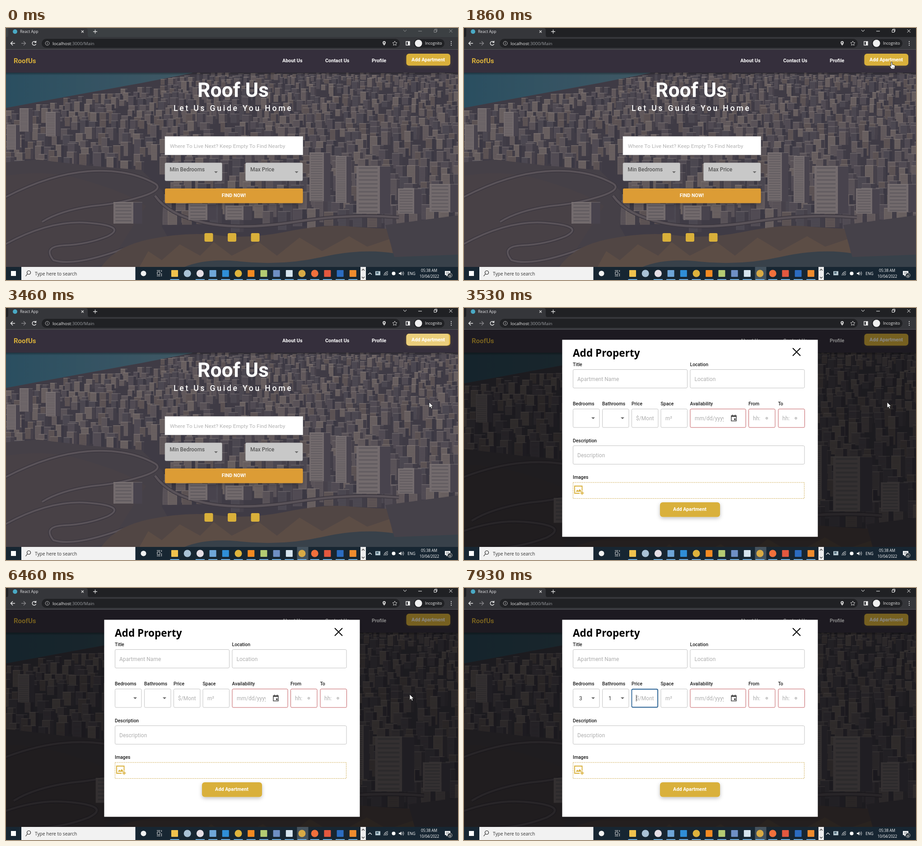
Animation, 1001 px wide and 559 px high, one loop 8 s. Source, as an HTML page:

```html
<!DOCTYPE html>
<html lang="en">
<head>
<meta charset="utf-8">
<title>Apartment finder</title>
<style>
html, body { margin: 0; width: 100%; height: 100%; overflow: hidden; background: #202124; }
svg { display: block; width: 100vw; height: 100vh; }
text { white-space: pre; }
</style>
</head>
<body>
<svg id="stage" viewBox="0 0 1001 559" preserveAspectRatio="none"></svg>
<script>
const LOOP = 8000;
const GOLD = '#d9b03a';
const ROBOTO = 'Roboto, sans-serif', SYSTEM = "'Open Sans', sans-serif";

// ---- drawing helpers ----
const rect = (x, y, w, h, fill, more = '') =>
  `<rect x="${x}" y="${y}" width="${w}" height="${h}" fill="${fill}" ${more}/>`;
const disc = (x, y, r, fill, more = '') =>
  `<circle cx="${x}" cy="${y}" r="${r}" fill="${fill}" ${more}/>`;
const shape = (d, fill, more = '') => `<path d="${d}" fill="${fill}" ${more}/>`;
const line = (d, stroke, width = 1, more = '') =>
  `<path d="${d}" fill="none" stroke="${stroke}" stroke-width="${width}" ${more}/>`;
const text = (x, y, size, fill, str, { w = 400, font = ROBOTO, mid = false, ls = 0, more = '' } = {}) =>
  `<text x="${x}" y="${y}" font-size="${size}" fill="${fill}" font-weight="${w}" font-family="${font}"` +
  ` letter-spacing="${ls}" ${mid ? 'text-anchor="middle"' : ''} ${more}>${str}</text>`;
const group = (id, body, more = '') => `<g id="${id}" ${more}>${body}</g>`;
const caretDown = (x, y, fill) => shape(`M${x - 4} ${y}h8l-4 4z`, fill);

function randomizer(seed) {
  return () => (seed = (seed * 16807) % 2147483647) / 2147483647;
}

// ---- aerial city backdrop ----
function tower(x, y, w, h, face, side) {
  const s = w * 0.45, floor = Math.max(1.2, w * 0.07);
  return rect(x, y, w, h, face) + rect(x + w, y + 1, s, h - 1, side) +
    line(`M${x + w / 2} ${y + 3}V${y + h}`, '#37343d', w * 0.8,
      `stroke-dasharray="${floor} ${floor * 1.4}" opacity=".25"`) +
    rect(x, y, w + s, 1.2, '#9a918c', 'opacity=".5"');
}

function city() {
  const rnd = randomizer(2024);
  const faces = ['#635c5e', '#6d6463', '#585359', '#766c68', '#524e55', '#665c59'];
  const sides = ['#423f47', '#3b3942', '#48434a'];
  const pick = list => list[Math.floor(rnd() * list.length)];
  const shore = x => 178 - x * 0.19;
  let out = '';
  for (let row = 0; row < 24; row++) {
    const depth = row / 23, y = 100 + 310 * Math.pow(depth, 1.25);
    for (let x = -10 + rnd() * 10; x < 1005;) {
      const w = 5 + depth * 11 + rnd() * 6, h = 8 + depth * 20 + rnd() * (12 + depth * 18);
      const top = y - h * 0.3 + rnd() * 10;
      const hill = x < 345 && top > 285 + Math.abs(x - 150) * 0.1;
      const sea = x < 420 && top < shore(x);
      if (!hill && !sea && rnd() < 0.86) out += tower(x, top, w, h, pick(faces), pick(sides));
      x += w * 1.45 + rnd() * (5 + depth * 6);
    }
  }
  return out;
}

function photo() {
  const road = (d, w) => line(d, '#3b373d', w + 3) + line(d, '#5f585c', w);
  const block = (x, y, w, h) => tower(x, y, w, h, '#7c7473', '#4a464e');
  return rect(-80, 60, 1160, 560, '#403d45') +
    shape('M-80 60H460L412 100 300 122 190 142 60 166-80 192z', 'url(#sea)') +
    city() +
    shape('M-80 305L70 292 180 305 300 315 350 365 345 440 400 540-80 620z', '#474247') +
    shape('M-80 345Q60 305 165 335T310 395L230 520-80 600z', '#4c4446', 'opacity=".8"') +
    road('M-20 385Q90 325 180 318T330 345Q350 358 300 374T190 395Q120 405 80 430', 4) +
    road('M-20 490Q90 425 180 432T225 462Q180 480 130 482T105 515Q150 530 260 490', 4) +
    road('M330 372Q360 415 440 432T640 430T870 420', 5) +
    shape('M205 540Q235 485 320 468T470 460T620 452T760 440T870 446L905 540z', '#554944') +
    shape('M290 540L315 495 345 515 385 480 430 505 460 475 500 505 560 475 600 505 650 465 700 495 760 462 800 485 850 468 865 540z',
      '#6b5846', 'opacity=".6"') +
    shape('M375 540Q430 508 520 518T700 508T860 500L1080 475V620H375z', '#38434a') +
    shape('M840 437L1080 405V500L860 508z', '#474349') +
    block(238, 386, 44, 48) + block(2, 214, 20, 56) + block(30, 178, 20, 52) + block(88, 186, 22, 54) +
    block(672, 276, 32, 108) + block(730, 284, 24, 104) + block(776, 306, 52, 106) +
    block(868, 356, 36, 56) + block(938, 346, 46, 62) + block(404, 390, 42, 36) + block(486, 394, 40, 32) +
    shape('M-80 60H1080V620H-80z', '#3a3548', 'opacity=".14"');
}

// ---- browser ----
function browser() {
  const sys = { font: SYSTEM };
  const controls = line('M880 4l3.5 4 3.5-4M913 7h8M948 4.500h5v5h-5zM949.500 4v-1.500h5v5h-1.500M981.500 3l7 7m0-7l-7 7', '#fff');
  return rect(0, 0, 1001, 21, '#202124', 'id="tabStrip"') +
    shape('M0 21Q5 21 5 15V0H176Q181 0 181 5V15Q181 21 187 21z', '#35363a') +
    rect(0, 20, 1001, 28, '#35363a') + rect(0, 47, 1001, 1, '#56565b') +
    disc(20, 8, 5, '#4aa9c4') + text(31, 11, 8.7, '#e4e4e6', 'React App', sys) +
    line('M167 5.500l5 5m0-5l-5 5', '#ddd', 1.1) + line('M193 8h9M197.500 3.500v9', '#ddd', 1.3) +
    group('controls', controls) +
    line('M20 34h-9m4-4.500l-4.500 4.500 4.500 4.500', '#e8e8e8', 1.5) +
    line('M34 34h9m-4-4.500l4.500 4.500-4.500 4.500', '#858589', 1.4) +
    line('M66 31.500a4.300 4.300 0 1 0 .5 4M66.500 28.500v3.500h-3.500', '#e8e8e8', 1.5) +
    rect(79, 24, 793, 20, '#202124', 'rx="10"') +
    disc(91.500, 34, 4.400, 'none', 'stroke="#bbb"') + line('M91.500 33.300v3M91.500 31v1.200', '#bbb') +
    text(103, 37.5, 9.8, '#9b9ea2', '<tspan fill="#eee">localhost</tspan>:3000/Main', sys) +
    shape('M837.500 39q-3.500-4-3.500-6.500a3.500 3.500 0 0 1 7 0q0 2.500-3.500 6.500z', '#ccc') + disc(837.5, 32.5, 1.2, '#202124') +
    line('M861 29l1.500 3.200 3.500.4-2.600 2.400.7 3.500-3.100-1.700-3.100 1.700.7-3.500-2.600-2.400 3.500-.4z', '#ccc') +
    line('M886 30h8v8h-8z', '#eee', 1.4) + rect(890, 30, 4, 8, '#eee') +
    rect(903, 24.5, 68, 19, '#202124', 'rx="9.5"') + disc(913.5, 34, 8, '#f1f1f1') +
    text(928, 37, 8.6, '#eee', 'Incognito', sys) +
    [30, 34, 38].map(y => disc(986, y, 1.1, '#eee')).join('');
}

// ---- landing page ----
function page() {
  const menu = (x, label) => rect(x, 299, 126.5, 40, '#c8c8c8', 'rx="2.500" stroke="#aaa" stroke-width=".6"') +
    text(x + 10.5, 317.5, 11.9, '#575757', label, { w: 500 }) + caretDown(x + 113, 318, '#6a6a6a');
  return group('view', group('photo', photo()), 'clip-path="url(#viewClip)"') +
    rect(0, 98, 1001, 7, 'url(#navShade)') + rect(0, 48, 1001, 51, '#352f3c') +
    text(17, 78, 15, GOLD, 'RoofUs', { w: 700 }) +
    [[612, 'About Us'], [707, 'Contact Us'], [810, 'Profile']]
      .map(([x, s]) => text(x, 75.5, 10.8, '#fff', s, { w: 700 })).join('') +
    rect(886.5, 57, 97.5, 26.5, GOLD, 'rx="6" filter="url(#glow)"') +
    group('ripple', disc(934, 70, 49, '#ebcf7c', 'id="wave"'), 'clip-path="url(#buttonClip)"') +
    text(935, 73.5, 10.8, '#fff', 'Add Apartment', { w: 700, mid: true }) +
    text(503, 152.5, 44.5, '#fff', 'Roof Us', { w: 700, mid: true }) +
    text(371, 183.5, 17.6, '#fff', 'Let Us Guide You Home', { w: 500, ls: 3.75 }) +
    rect(352, 240.5, 305.5, 41, '#fff', 'stroke="#ccc" stroke-width=".7"') +
    text(363, 265.5, 11.8, '#b3b3b3', 'Where To Live Next? Keep Empty To Find Nearby', { ls: 0.05 }) +
    menu(352, 'Min Bedrooms') + menu(530.5, 'Max Price') +
    rect(352, 356, 305.5, 32.5, '#dc9c34', 'rx="2.500" filter="url(#soft)"') +
    text(504.5, 375, 10.7, '#fff', 'FIND NOW!', { w: 700, mid: true }) +
    [439.5, 491, 542.5].map(x => rect(x, 455, 19, 19, GOLD, 'rx="3"')).join('');
}

// ---- dialog ----
function dialog() {
  const field = (x, y, w, edge = '#c2c2c2') => rect(x + 0.5, y, w, 41, '#fff', `rx="2.500" stroke="${edge}"`);
  const label = (x, y, s) => text(x, y, 10.4, '#1c1c1c', s, { w: 500 });
  const hint = (x, y, s, more = '') => text(x, y, 11.9, '#adadad', s, { ls: 0.1, more });
  const RED = '#c25c60';
  const clock = x => disc(x, 244.5, 2.2, 'none', 'stroke="#888" stroke-width=".8"') + disc(x, 244.5, 0.7, '#777');
  const columns = [[241, 'Bedrooms'], [306, 'Bathrooms'], [371, 'Price'], [435.5, 'Space'],
    [500.5, 'Availability'], [630, 'From'], [695.5, 'To']];
  return rect(0, 48, 1001, 51, '#000', 'opacity=".46"') + rect(0, 99, 1001, 431, '#000', 'opacity=".55"') +
    rect(217.5, 70.5, 566, 437, '#fff', 'filter="url(#soft)"') +
    text(241, 107.5, 22.6, '#000', 'Add Property', { w: 700, font: SYSTEM }) +
    line('M728 89l17 17m0-17l-17 17', '#000', 1.9) +
    label(241, 129, 'Title') + label(500.5, 129, 'Location') +
    field(241, 136.5, 253) + field(500.5, 136.5, 253) +
    hint(251, 161.5, 'Apartment Name') + hint(510.5, 161.5, 'Location') +
    columns.map(([x, s], i) => label(x, 216, s) + field(x, 224, i === 4 ? 123 : 58.5, i > 3 ? RED : undefined)).join('') +
    caretDown(286, 242.5, '#666') + caretDown(351, 242.5, '#666') +
    group('bedrooms', text(255, 248.5, 11.9, '#333', '3')) +
    group('bathrooms', text(320, 248.5, 11.9, '#333', '1')) +
    hint(381, 248.5, '$/Month', 'clip-path="url(#priceClip)"') + hint(446, 248.5, 'm²') +
    hint(511, 248.5, 'mm/dd/yyyy', 'clip-path="url(#dateClip)"') +
    hint(640, 248.5, 'hh:') + hint(705, 248.5, 'hh:') + clock(670.5) + clock(735) +
    line('M592 239h11v11.500h-11zM594.500 236.500v2M600.500 236.500v2', '#444', 1.5) +
    rect(592, 238.5, 11, 3, '#444') + rect(598, 245, 3.5, 3.5, '#444') +
    group('priceFocus', rect(371.5, 224.5, 57.5, 40, 'none', 'rx="2.500" stroke="#2d6699" stroke-width="1.800"') +
      line('M381.500 237v14.500', '#333')) +
    label(241, 297.5, 'Description') + field(241, 305.5, 512.5) + hint(251, 330.5, 'Description') +
    label(241, 379, 'Images') +
    rect(241.5, 387, 512, 35.5, 'none', 'stroke="#d0ae58" stroke-dasharray="2.500 1.500"') +
    line('M256 411h-11v-16h16.500v10M261.500 406v8.500M257.500 410.500h8', GOLD, 1.9) +
    shape('M247.500 407.500l3.500-4.500 2.500 2.500 3-4 4 6z', GOLD) +
    rect(434, 431, 133, 32.5, GOLD, 'rx="6" filter="url(#soft)"') +
    text(500, 450, 10.8, '#fff', 'Add Apartment', { w: 700, mid: true });
}

// ---- taskbar ----
function taskbar() {
  const sys = { font: SYSTEM };
  const apps = ['#f0c14d', '#a9c2d6', '#e5dfe6', '#6fa6d8', '#2f8ed6', '#dfb43c', '#f28a22', '#b4cb72',
    '#6f8fc4', '#d5e4ee', '#d8aa45', '#f2703c', '#e3583f', '#2c6cc0', '#ef8c2e'];
  const round = [1, 2, 5, 10, 11];
  const icons = apps.map((color, i) => {
    const x = 373.5 + i * 28.2;
    return (round.includes(i) ? disc(x, 544.5, 8, color) : rect(x - 7.5, 537, 15, 15, color, 'rx="1"')) +
      (i === 1 ? '' : rect(x - 10, 557, 20, 2, '#6cabdc'));
  }).join('');
  return rect(0, 530, 1001, 29, '#172632') + rect(11, 539, 11, 11, '#fff') +
    rect(34, 530, 252.5, 29, '#f2f2f2') +
    disc(50.5, 542.5, 4, 'none', 'stroke="#222" stroke-width="1.200"') + line('M47.500 545.500l-4 5', '#222', 1.2) +
    text(64, 548.5, 10.2, '#333', 'Type here to search', sys) +
    disc(304.5, 544.5, 6, '#f1f1f1') +
    line('M335 541h6v6h-6zM334 538h8M334 550h8M344.500 537v4M344.500 544v7', '#e4e4e4') +
    group('active', rect(644.5, 530, 25, 29, '#44525d')) + icons +
    rect(785, 530, 12, 29, '#eee') + line('M788 538l3-3 3 3M788 552l3 3 3-3', '#444', 1.3) +
    line('M802 547l4-4 4 4', '#fff', 1.2) +
    rect(818, 539.5, 11, 9, '#b9cbd3') + rect(820, 541, 5, 4, '#547080') +
    line('M837 549a10 10 0 0 1 9-9M840 549a7 7 0 0 1 6-6M843 549a4 4 0 0 1 3-3', '#eee', 1.1) +
    disc(858.5, 544.5, 4, '#fff') +
    shape('M870 543h2.500l3-3v9l-3-3h-2.500z', '#eee') + line('M877 542q2 2.500 0 5M879 540q3.500 4.500 0 9', '#eee') +
    text(898, 548, 8.5, '#fff', 'ENG', { ...sys, mid: true }) +
    text(937, 541, 8.3, '#fff', '05:38 AM', { ...sys, mid: true }) +
    text(937.5, 554, 8.2, '#fff', '10/04/2022', { ...sys, mid: true }) +
    shape('M972 539h12v9h-6l-3 3v-3h-3z', '#fff') + line('M974 542h8M974 545h6', '#172632', 0.8) +
    disc(983, 548.5, 5, '#303940', 'stroke="#ddd" stroke-width=".8"') +
    text(983, 551.5, 8, '#fff', '4', { ...sys, mid: true });
}

const defs = `<defs>
  <clipPath id="viewClip"><rect y="98" width="1001" height="432"/></clipPath>
  <clipPath id="buttonClip"><rect x="886.5" y="57" width="95" height="26.500" rx="6"/></clipPath>
  <clipPath id="priceClip"><rect x="380" y="230" width="40" height="30"/></clipPath>
  <clipPath id="dateClip"><rect x="510" y="230" width="65" height="30"/></clipPath>
  <linearGradient id="sea"><stop stop-color="#235163"/><stop offset="1" stop-color="#44606a"/></linearGradient>
  <linearGradient id="navShade" x2="0" y2="1"><stop stop-opacity=".4"/><stop offset="1" stop-opacity="0"/></linearGradient>
  <filter id="glow" x="-20%" y="-50%" width="140%" height="220%"><feDropShadow dx="0" dy="2" stdDeviation="4" flood-color="#d9b03a" flood-opacity=".16"/></filter>
  <filter id="soft" x="-15%" y="-40%" width="130%" height="200%"><feDropShadow dx="0" dy="3" stdDeviation="4" flood-opacity=".25"/></filter>
</defs>`;
const ARROW = shape('M0 0V12.500L3 9.800 5 14.300 7.200 13.300 5.200 9H9z', '#fff', 'stroke="#111" stroke-width=".8"');
const HAND = shape('M-1.300 1Q0-.6 1.300 1V6L5 6.800Q8 7.300 7.500 10L6.500 16H0L-4.500 10Q-4.200 8-1.300 10z',
  '#fff', 'stroke="#111" stroke-width=".9"') + line('M2 12v2.500M4.500 12v2.500', '#111', 0.7);

const stage = document.getElementById('stage');
stage.innerHTML = defs + page() + group('dialog', dialog()) + browser() + taskbar() +
  group('cursor', group('arrow', ARROW) + group('hand', HAND));

// ---- motion ----
const el = id => document.getElementById(id);
const show = (id, on) => el(id).setAttribute('visibility', on ? 'inherit' : 'hidden');
const clamp01 = v => Math.min(1, Math.max(0, v));

// Each move: start, end, destination x, y
const moves = [
  [800, 860, 979, 206], [1000, 1200, 957, 92], [1400, 1460, 947, 75],
  [2060, 2460, 937, 209], [4800, 4801, 937, 210], [5330, 5460, 927, 216],
  [6200, 6460, 894, 236], [6730, 6860, 775, 243], [7000, 7200, 270, 246],
  [7600, 7690, 335, 246], [7800, 7900, 400, 246]
];

function pointerAt(t) {
  let x = 979, y = 350;
  for (const [start, end, toX, toY] of moves) {
    const k = clamp01((t - start) / (end - start));
    x += (toX - x) * k;
    y += (toY - y) * k;
  }
  return [x, y];
}

function render(t) {
  const focused = t >= 1860, open = t >= 3530;
  el('tabStrip').setAttribute('fill', focused ? '#202124' : '#3c4043');
  el('controls').setAttribute('opacity', focused ? 1 : 0.42);
  show('active', focused);

  show('ripple', t >= 2000 && !open);
  el('wave').setAttribute('r', 52 * clamp01((t - 2000) / 400));

  show('dialog', open);
  el('photo').setAttribute('transform', open ? 'translate(500 150) scale(1.15) translate(-500 -150)' : '');
  show('bedrooms', open && t >= 7530);
  show('bathrooms', open && t >= 7730);
  show('priceFocus', open && t >= 7900);

  const [x, y] = pointerAt(t);
  const onButton = !open && x > 886 && x < 984 && y > 57 && y < 84;
  const onSelect = open && y > 224 && y < 265 && x > 241 && x < 365;
  show('cursor', t >= 800 && t < 7900);
  show('hand', onButton || onSelect);
  show('arrow', !onButton && !onSelect);
  el('cursor').setAttribute('transform', `translate(${x} ${y})`);
}

const began = performance.now();
function tick() {
  render((performance.now() - began) % LOOP);
  requestAnimationFrame(tick);
}
tick();
</script>
</body>
</html>
```
